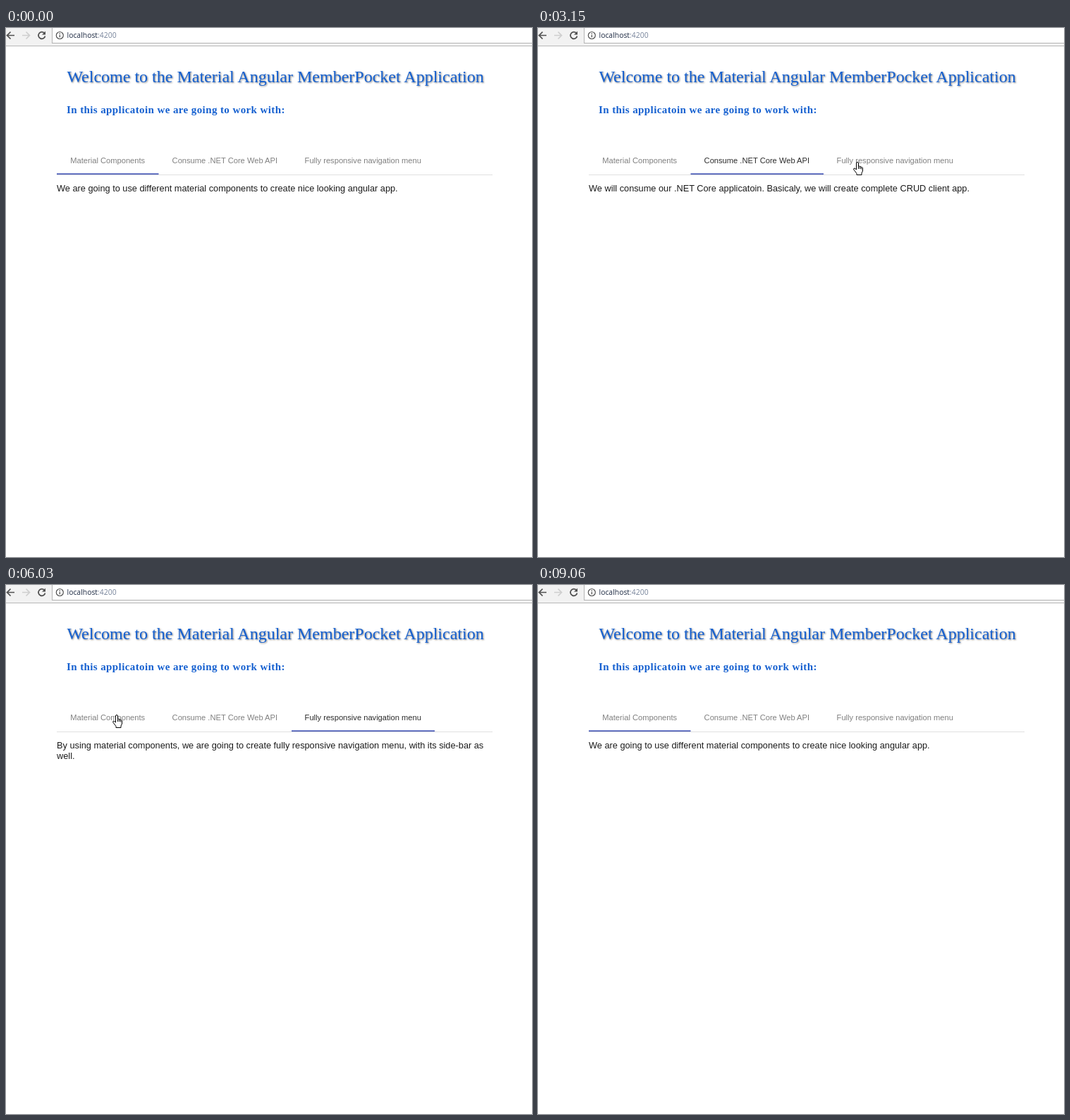
Animation, 746 px wide and 751 px high, one loop 9.14 s. Source, as an HTML page:

```html
<!DOCTYPE html>
<html lang="en">
<head>
<meta charset="utf-8">
<title>Tabs demo</title>
<style>
  html, body { margin: 0; width: 100%; height: 100%; overflow: hidden; background: #fff; }
  svg { display: block; }
  text { font-family: "Liberation Sans", Arial, sans-serif; white-space: pre; }
  .url { font: 10.4px "Open Sans", sans-serif; fill: #1f2c44; }
  .title, .lead { font-family: "Liberation Serif", "Times New Roman", serif; fill: #1560d0; }
  .title { font-size: 24px; filter: drop-shadow(1.6px 1.6px .8px gray); }
  .lead { font-size: 15px; font-weight: bold; letter-spacing: .4px; }
  .label { font-size: 11.15px; fill: #2c2c2c; }
  .page { font-size: 12.75px; fill: #1c1c1c; }
  .icon { fill: none; stroke: #505050; stroke-width: 1.7; }
  .cursor { fill: #fff; stroke: #000; stroke-linejoin: round; }
</style>
</head>
<body>
<svg width="746" height="751" viewBox="0 0 746 751">
  <!-- browser bar -->
  <rect width="746" height="25" fill="#f2f2f2"/>
  <rect x="65.5" y="-3.5" width="700" height="25" fill="#fff" stroke="#b4b4b4"/>
  <rect y="25" width="746" height="1" fill="#b8b8b8"/>
  <path class="icon" d="M12 10.5H1.5M6.5 5.5l-5 5 5 5"/>
  <path class="icon" style="stroke:#cfcfcf" d="M23 10.5h10.5M28.5 5.5l5 5-5 5"/>
  <path class="icon" d="M54.3 7.2A4.8 4.8 0 1 0 55.5 11.5"/>
  <path fill="#505050" d="M56 4.5v5h-5z"/>
  <circle class="icon" style="stroke-width:1.2" cx="76.3" cy="10.5" r="5"/>
  <path class="icon" style="stroke-width:1.3" d="M76.3 9.7v3.6M76.3 7.3v1.4"/>
  <text class="url" x="86.5" y="14.3">localhost<tspan fill="#76839a">:4200</tspan></text>

  <text class="title" x="86.4" y="77">Welcome to the Material Angular MemberPocket Application</text>
  <text class="lead" x="86" y="121">In this applicatoin we are going to work with:</text>

  <!-- tab strip -->
  <rect x="72" y="208" width="618" height="1" fill="#e0e0e0"/>
  <svg id="tab" y="170" height="38"><circle id="ripple"/></svg>
  <text class="label" x="91.3" y="192.3">Material Components</text>
  <text class="label" x="235.6" y="192.3">Consume .NET Core Web API</text>
  <text class="label" x="423.6" y="192.3">Fully responsive navigation menu</text>
  <rect id="bar" y="206.4" height="1.6" fill="#3f51b5"/>

  <svg x="72" y="209" width="618" height="60">
    <text class="page" y="23">We are going to use different material components to create nice looking angular app.</text>
    <text class="page" y="23">We will consume our .NET Core applicatoin. Basicaly, we will create complete CRUD client app.</text>
    <text class="page" y="23">By using material components, we are going to create fully responsive navigation menu, with its side-bar as<tspan class="wrap" x="0" dy="14.7">well.</tspan></text>
  </svg>

  <g id="cursor" class="cursor">
    <path id="arrow" d="M.5 .5V16l3.7-3.6 2.4 5.6 2.3-1-2.4-5.4h5z"/>
    <g id="hand" transform="translate(-6 0)">
      <path d="M4.5 11V2a1.5 1.5 0 0 1 3 0V6.5a1.3 1.3 0 0 1 2.2 .5 1.3 1.3 0 0 1 2 .7 1.2 1.2 0 0 1 1.8 1V13l-1.5 3v2.5H5V16.5L.8 11Q.3 9 2 9z"/>
      <path fill="none" d="M7.5 6.5V10M9.7 7v3M11.7 8v2.5"/>
    </g>
  </g>
</svg>
<script>
const LOOP = 9140, PAGE = 618;
const tabs = [{ x: 72, w: 144.5 }, { x: 216.5, w: 188.5 }, { x: 405, w: 203 }];

// Busy stretches: start, end, number of equal steps
const spans = [
  [0, 0, 0], [590, 1390, 10], [1770, 1930, 2], [1930, 2470, 7], [2620, 3150, 7],
  [3150, 3500, 4], [3850, 4260, 5], [4260, 4490, 3], [5410, 6030, 8],
  [6330, 6750, 5], [6750, 7050, 4], [7890, 8360, 6], [9060, 9060, 0]
];
// Mouse down, start of the slide, tabs, ripple centre and size
const clicks = [
  { down: 1770, go: 1911, from: 0, to: 1, x: 311, y: 191, r: 92 },
  { down: 3850, go: 3958, from: 1, to: 2, x: 498, y: 188, r: 112 },
  { down: 6330, go: 6499, from: 2, to: 0, x: 156, y: 186, r: 87 }
];
// Pointer path: time, x, y
const path = [
  [590, 578, 676], [990, 420, 388], [1390, 312, 190],
  [2540, 312, 190], [3150, 453, 190], [3500, 500, 186],
  [5330, 500, 186], [5700, 320, 169.5], [6030, 157, 184],
  [7810, 157, 184], [8282, 691, 684]
];

const $ = id => document.getElementById(id);
const labels = document.querySelectorAll('.label');
const pages = document.querySelectorAll('.page');
const wrap = document.querySelector('.wrap');
const set = (el, attrs) => { for (const k in attrs) el.setAttribute(k, attrs[k]); };
const clamp = v => Math.max(0, Math.min(1, v));
const mix = (a, b, p) => a + (b - a) * p;

// cubic-bezier(x1, 0, x2, 1)
function ease(x1, x2, x) {
  if (x <= 0 || x >= 1) return clamp(x);
  let lo = 0, hi = 1, s;
  for (let i = 0; i < 24; i++) {
    s = (lo + hi) / 2;
    const at = 3 * x1 * s * (1 - s) ** 2 + 3 * x2 * s * s * (1 - s) + s ** 3;
    if (at < x) lo = s; else hi = s;
  }
  return s * s * (3 - 2 * s);
}

function snap(t) {
  const [a, b, n] = spans.filter(s => s[0] <= t).pop();
  return n ? a + Math.floor((Math.min(t, b) - a) * n / (b - a) + 1e-6) * (b - a) / n : a;
}

function drawTabs(t) {
  const click = clicks.filter(c => c.down <= t).pop();
  const { from, to, go } = click || { from: 0, to: 0, go: 0 };
  const p = ease(.35, .25, (t - go) / 500);
  const dir = Math.sign(to - from);

  set($('bar'), { x: mix(tabs[from].x, tabs[to].x, p), width: mix(tabs[from].w, tabs[to].w, p) });
  labels.forEach((el, i) => set(el, { opacity: click && i === to && t < 9060 ? 1 : .6 }));
  pages.forEach((el, i) => {
    const x = i === to ? dir * (1 - p) * PAGE : -dir * p * PAGE;
    const shown = i === to ? p > 0 || !click : i === from && p < 1;
    set(el, { x, visibility: shown ? 'visible' : 'hidden' });
  });
  set(wrap, { x: pages[2].getAttribute('x') });

  if (!click) return set($('ripple'), { r: 0 });
  const tab = tabs[to], age = t - click.down;
  set($('tab'), { x: tab.x, width: tab.w });
  set($('ripple'), {
    cx: click.x - tab.x, cy: click.y - 170,
    r: click.r * ease(0, .2, age / 450),
    'fill-opacity': .1 * (1 - clamp((age - 450) / 180))
  });
}

function drawCursor(t) {
  const shown = t >= 590 && t < 8360;
  set($('cursor'), { visibility: shown ? 'visible' : 'hidden' });
  if (!shown) return;
  const i = path.filter(k => k[0] <= t).length;
  const a = path[i - 1], b = path[i] || a;
  const p = b === a ? 0 : (t - a[0]) / (b[0] - a[0]);
  const x = mix(a[1], b[1], p), y = mix(a[2], b[2], p);
  set($('cursor'), { transform: `translate(${Math.round(x)} ${Math.round(y)})` });
  set($('hand'), { display: y < 208 ? 'inline' : 'none' });
  set($('arrow'), { display: y < 208 ? 'none' : 'inline' });
}

const begin = performance.now();
function frame() {
  const t = snap((performance.now() - begin) % LOOP);
  drawTabs(t);
  drawCursor(t);
  requestAnimationFrame(frame);
}
frame();
</script>
</body>
</html>
```
